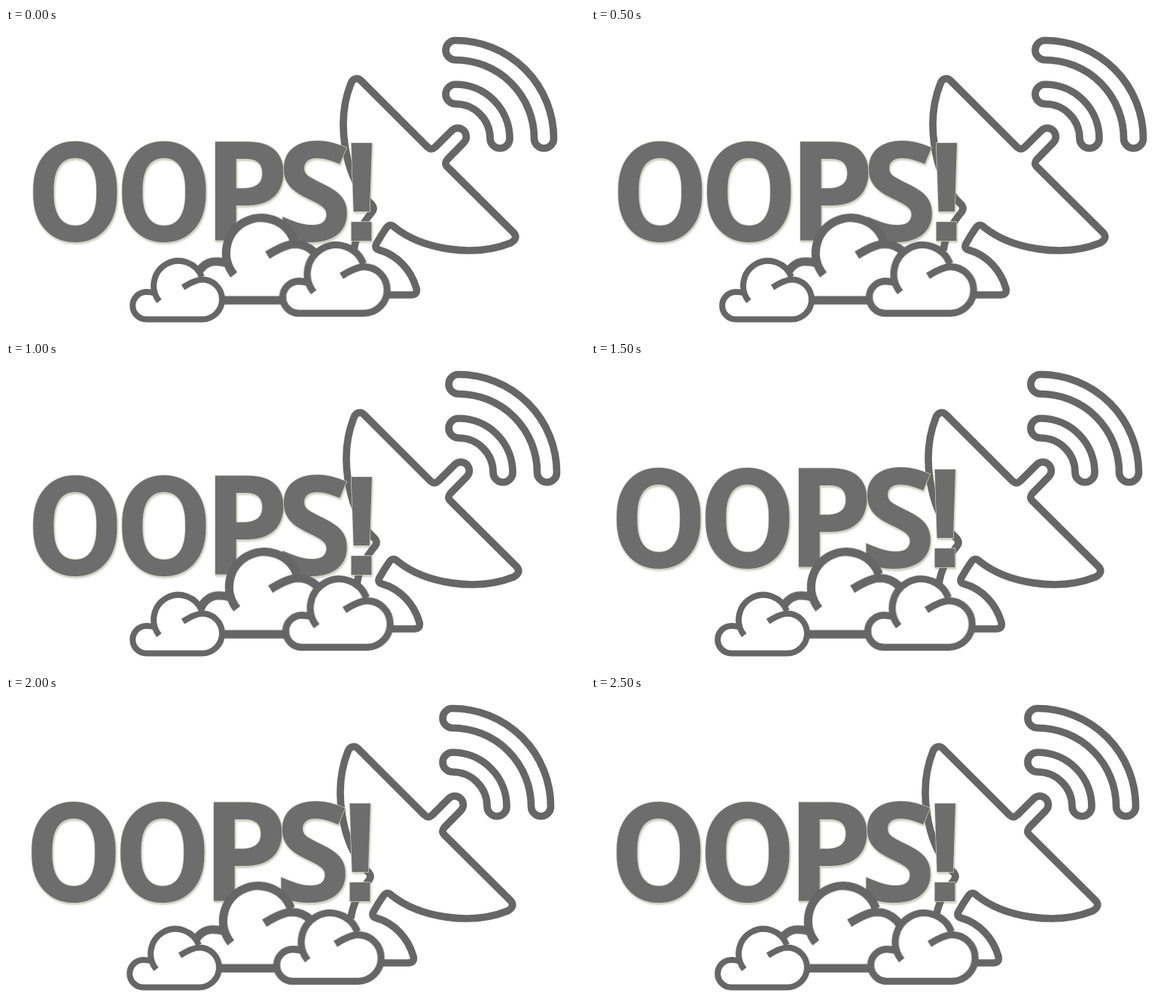
An HTML page for the animation above (3 s loop, 769x407 px).

```html
<!DOCTYPE html>
<html lang="en">
<head>
<meta charset="utf-8">
<title>Oops!</title>
<style>
  html, body { margin: 0; width: 100%; height: 100%; overflow: hidden; background: #fff; }
  svg { display: block; width: 769px; height: 407px; }

  .line { fill: none; stroke: #666; stroke-width: 9.7; stroke-linejoin: round; }
  .cloud .line { stroke-width: 8; }

  .word {
    font-weight: 700;
    fill: #6d6d6d;
    stroke: #d6d8c4;
    stroke-width: 1.4;
    paint-order: stroke;
    filter: drop-shadow(1px 2px 1px rgba(110, 110, 80, .38));
  }
  .round { font-family: Roboto, sans-serif; font-size: 183.5px; }
  .narrow { font-family: "Noto Sans", "Open Sans", sans-serif; font-size: 183.5px; font-stretch: 94%; }
  .mark { font-family: "Liberation Sans", Arial, sans-serif; font-size: 190px; }

  .dish, .back, .left, .right, .word { animation: 3s step-end infinite; }
  .dish, .back { animation-name: sway; }
  .left { animation-name: left; }
  .right { animation-name: right; }
  .word { animation-name: hop; }

  @keyframes sway {
    0% { transform: translateX(0); }
    16.6667% { transform: translateX(6px); }
    33.3333% { transform: translateX(4px); }
    50% { transform: translateX(0); }
    66.6667%, 100% { transform: translateX(-4px); }
  }
  @keyframes left {
    0% { transform: translateX(0); }
    16.6667% { transform: translateX(6px); }
    33.3333% { transform: translateX(0); }
    66.6667% { transform: translateX(-4px); }
    83.3333%, 100% { transform: translateX(0); }
  }
  @keyframes right {
    0% { transform: translateX(0); }
    16.6667% { transform: translateX(2px); }
    33.3333% { transform: translateX(4px); }
    50% { transform: translateX(0); }
    66.6667% { transform: translateX(-8px); }
    83.3333%, 100% { transform: translateX(4px); }
  }
  @keyframes hop {
    0% { transform: translate(0, 0); }
    50%, 100% { transform: translate(-2px, -10px); }
  }
</style>
</head>
<body>
<svg viewBox="0 0 769 407" xmlns="http://www.w3.org/2000/svg">
  <defs>
    <g id="cloud" class="cloud">
      <path fill="#fff" d="M187 387.5A18 18 0 0 1 187 352L197 350A33 33 0 0 1 260 331V334.5A26.5 26.5 0 0 1 260 387.5Z"/>
      <path class="line" d="M197 352.5Q192 351 186.5 351A18.25 18.25 0 0 0 186.5 387.5H260.5A26.5 26.500 0 0 0 260.5 334.5Q251 335 235 345M203.500 363.500A33 33 0 1 1 260 331"/>
    </g>
  </defs>

  <g class="dish">
    <path class="line" d="M462 296C464 280 470 264 486 245Q490 240 486 235L479 228C450 192 438 124 458 74C461 66 468 66 472 70.5L560 158.5Q565 163 570 158.5L592 136.5A11.3 11.3 0 0 1 608 152.5L586.5 174.5Q581.5 180 586 184.5L674 272Q681 280 670 286C620 306 552 294 516 265Q510 259 505 266Q498 276 492 287Q489 293 495 295C520 302 538 322 545 346Q547 355 538 355H500"/>
    <path class="line" d="M597 16.5A130.5 130.5 0 0 1 727.5 147A13 13 0 0 1 701.5 147A104.5 104.5 0 0 0 597 42.5A13 13 0 0 1 597 16.5Z"/>
    <path class="line" d="M597 75A72 72 0 0 1 669 147A13 13 0 0 1 643 147A46 46 0 0 0 597 101A13 13 0 0 1 597 75Z"/>
  </g>

  <text class="word" y="283.2"><tspan class="round" x="28.6 146.5">OO</tspan><tspan class="narrow" x="261.5 359">PS</tspan><tspan class="mark" x="440.7">!</tspan></text>

  <g class="back"><use href="#cloud" transform="translate(15.8 -184.3) scale(1.41)"/></g>
  <g class="left"><use href="#cloud"/></g>
  <g class="right"><use href="#cloud" transform="translate(171 -73.2) scale(1.168)"/></g>
</svg>
</body>
</html>
```
